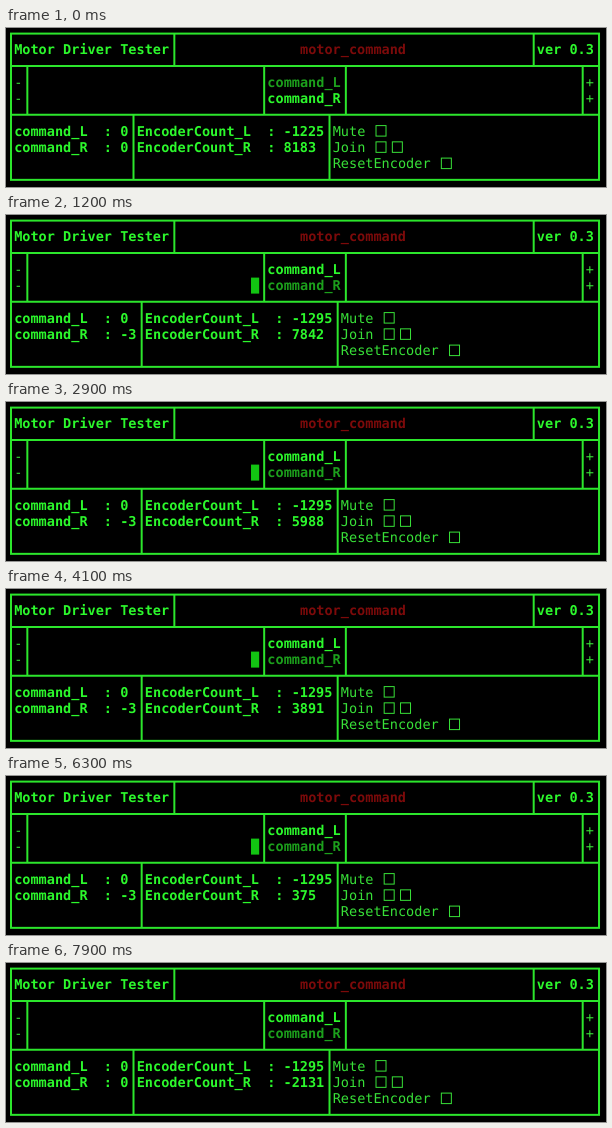
An HTML page that plays this animation: 600 px wide and 159 px high, repeating every 8 s.

```html
<!DOCTYPE html>
<html lang="en">
<head>
<meta charset="utf-8">
<title>Motor Driver Tester</title>
<style>
  html, body { margin: 0; width: 100%; height: 100%; overflow: hidden; background: #000; }
  svg { display: block; width: 600px; height: 159px; }
  text {
    font: 13.566px "DejaVu Sans Mono", "Noto Sans Mono", monospace;
    text-rendering: geometricPrecision;
    white-space: pre;
    fill: #38e038;
  }
  .bold, .topic, .dim { font-weight: 700; }
  .bold { fill: #2cf82c; }
  .topic { fill: #7c0a0a; }
  .dim { fill: #1ca01c; }
  .lines { fill: none; stroke: #2ce62c; stroke-width: 2; }
  .box { fill: none; stroke: #38e038; stroke-width: 1; }
  #cursor { fill: #12c412; }
</style>
</head>
<body>
<svg id="screen" viewBox="0 0 600 159"></svg>
<script>
const LOOP = 8000, TICK = 100;
const COL = 8.167, ROW = 16.25;
const screen = document.getElementById("screen");

// Terminal grid: column and row to pixels
const left = c => c * COL;
const midX = c => 5 + c * COL;
const midY = r => 5.6 + r * ROW;

function add(tag, attrs, parent = screen) {
  const el = document.createElementNS("http://www.w3.org/2000/svg", tag);
  for (const key in attrs) el.setAttribute(key, attrs[key]);
  parent.appendChild(el);
  return el;
}

function label(col, row, string, cls = "bold", parent = screen) {
  const el = add("text", { x: left(col), y: midY(row) + 4.6, class: cls }, parent);
  el.textContent = string;
  return el;
}

function wall(col, top, bottom, parent = screen) {
  add("path", { d: `M${midX(col)} ${midY(top)}V${midY(bottom)}`, class: "lines" }, parent);
}

function checkbox(col, row, parent) {
  add("rect", { x: left(col) + 2.5, y: midY(row) - 5.5, width: 10, height: 10.5, class: "box" }, parent);
}

// Frame and header
add("rect", { x: midX(0), y: midY(0), width: 72 * COL, height: 9 * ROW, class: "lines" });
for (const row of [2, 5]) {
  add("path", { d: `M${midX(0)} ${midY(row)}H${midX(72)}`, class: "lines" });
}
[20, 64].forEach(c => wall(c, 0, 2));
[2, 31, 41, 70].forEach(c => wall(c, 2, 5));
label(1, 1, "Motor Driver Tester");
label(36, 1, "motor_command", "topic");
label(65, 1, "ver 0.3");

// Sliders
for (const row of [3, 4]) {
  label(1, row, "-", "");
  label(71, row, "+", "");
}
const names = [label(32, 3, "command_L"), label(32, 4, "command_R")];
const cursor = add("rect", { id: "cursor", x: left(30), y: midY(4) - 8, width: COL, height: 16 });

// Readouts; everything right of the commands moves with their width
label(1, 6, "command_L  : 0");
const commandR = label(1, 7, "");
const panels = add("g", {});
wall(15, 5, 9, panels);
wall(39, 5, 9, panels);
const countL = label(16, 6, "", "bold", panels);
const countR = label(16, 7, "", "bold", panels);
label(40, 6, "Mute", "", panels);
label(40, 7, "Join", "", panels);
label(40, 8, "ResetEncoder", "", panels);
[[45, 6], [45, 7], [47, 7], [53, 8]].forEach(([c, r]) => checkbox(c, r, panels));

// Encoder readings as [ms, count]
const leftTrack = [[0, -1225], [200, -1266], [400, -1288], [700, -1295], [LOOP, -1295]];
const rightTrack = [
  [0, 8183], [300, 8170], [700, 8080], [1200, 7842], [2000, 7160], [2900, 5988],
  [4100, 3891], [5400, 1832], [6300, 375], [7600, -1744], [7900, -2131], [LOOP, -2230]
];
const commandTrack = [[0, 0], [300, -1], [400, -2], [500, -3], [7500, -2], [7600, -1], [7700, 0]];

function interpolate(track, t) {
  const i = track.findIndex(([time]) => time > t);
  const [t0, v0] = track[i - 1], [t1, v1] = track[i];
  return Math.round(v0 + (v1 - v0) * (t - t0) / (t1 - t0));
}

const hold = (track, t) => track.filter(([time]) => time <= t).pop()[1];

function draw() {
  const t = Math.floor(performance.now() % LOOP / TICK) * TICK;
  const command = hold(commandTrack, t);
  const selected = t < 200 ? 0 : 1;
  names.forEach((el, i) => el.setAttribute("class", i === selected ? "dim" : "bold"));
  cursor.setAttribute("visibility", command ? "visible" : "hidden");
  panels.setAttribute("transform", `translate(${command ? COL : 0} 0)`);
  commandR.textContent = `command_R  : ${command}`;
  countL.textContent = `EncoderCount_L  : ${interpolate(leftTrack, t)}`;
  countR.textContent = `EncoderCount_R  : ${interpolate(rightTrack, t)}`;
  requestAnimationFrame(draw);
}
draw();
</script>
</body>
</html>
```
